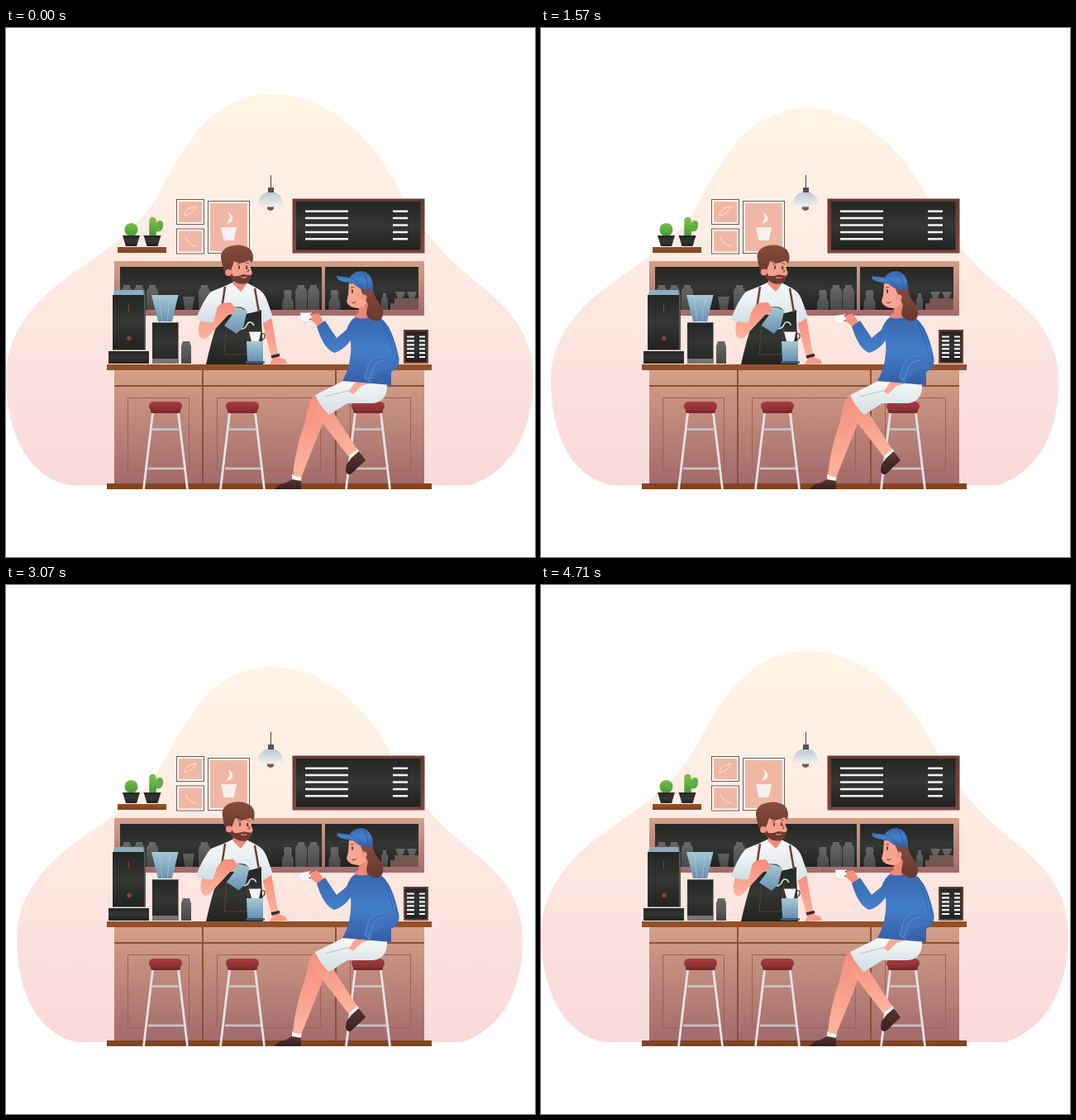
Write an HTML page that moves like this. It is 640 by 640 pixels and loops after 4.78 s.

```html
<!DOCTYPE html>
<html lang="en">
<head>
<meta charset="utf-8">
<title>Coffee bar</title>
<style>
html, body { margin: 0; width: 100%; height: 100%; overflow: hidden; background: #fff; }
svg { display: block; width: 100vw; height: 100vh; }
</style>
</head>
<body>
<svg viewBox="0 0 640 640" fill="none">
<defs id="defs">
  <g id="stool">
    <path d="M177 485.500H209M172 533H216" stroke="#c3bfc2" stroke-width="3"/>
    <path d="M177.500 466L166.500 558M208.500 466L219.500 558" stroke="#e5e3e5" stroke-width="2.800"/>
    <rect x="175" y="457" width="36" height="9" rx="2.500" fill="#7b2a2d"/>
    <rect x="173" y="452" width="40" height="11" rx="5.500" fill="url(#seat)"/>
  </g>
  <path id="bottle" d="M3 0H11V3Q14 5 14 8V30H0V8Q0 5 3 3Z" fill="url(#grey)"/>
  <path id="jug" d="M3 0H11L12 5L11 8L14 15V24H0V15L3 8L2 5Z" fill="url(#grey)"/>
  <path id="pot" d="M0 0H21L17 13H4Z" fill="url(#dark)"/>
</defs>

<path id="blob" fill="url(#wall)" d="M322 80C385 80 437 125 470 186C492 226 515 262 553 294C598 332 638 358 638 425C638 480 616 535 562 553H76C22 542 0 482 0 422C0 375 28 336 68 306C116 270 158 248 187 197C212 150 245 80 322 80Z"/>

<!-- lamp -->
<path d="M320.500 178V194" stroke="#4c4444"/>
<path d="M316 215H324V219Q320 223 316 219Z" fill="#80564d"/>
<path d="M305 215C304 204 312 198 320 198S336 204 335 215Q320 218 305 215Z" fill="url(#lamp)"/>
<rect x="317" y="193" width="7" height="6" fill="#594f50"/>

<!-- pictures -->
<g fill="#fff8f3" stroke="#665d60">
  <rect x="206.500" y="207.500" width="33" height="30"/>
  <rect x="206.500" y="243" width="33" height="30"/>
  <rect x="244.500" y="209.500" width="50" height="63"/>
</g>
<path d="M209 210H237V235H209ZM209 245.500H237V270.500H209ZM247 212H292V270H247Z" fill="#f0b8a4"/>
<path d="M216 227Q225 226 230 216Q217 217 216 227M217 253Q220 262 230 264" stroke="#fbe5dc"/>
<path d="M260 241H279L275.500 257H263.500Z" fill="#f7f0ee"/>
<path d="M267 237Q276 235 274 229Q273 225 268 223Q272 228 270 231Z" fill="#f7f0ee"/>

<!-- plants -->
<rect x="135" y="265" width="59" height="7" fill="url(#wood)"/>
<circle cx="151.500" cy="244" r="8" fill="url(#leaf)"/>
<path d="M177.500 251V233M180 242H184Q186 242 186 237" stroke="url(#leaf)" stroke-width="8.500" stroke-linecap="round"/>
<path d="M183 243Q186 243 186.500 237" stroke="#61ad45" stroke-width="5" stroke-linecap="round"/>
<use href="#pot" x="141" y="251"/><use href="#pot" x="166.500" y="251"/>

<!-- menu -->
<rect x="346.500" y="206.500" width="160" height="66" fill="url(#frame)"/>
<rect x="351" y="210" width="150.500" height="58.500" fill="url(#dark)"/>
<path id="menu" stroke="#f4f4f3" stroke-width="2.500"/>

<!-- back shelf -->
<rect x="131" y="282" width="375" height="66" fill="url(#rose)"/>
<path d="M138 289H382V341H138ZM386 289H499V341H386Z" fill="url(#dark)"/>
<use href="#bottle" x="139" y="311"/><use href="#bottle" x="154" y="311"/><use href="#bottle" x="170" y="311"/>
<use href="#bottle" x="233" y="311"/><use href="#bottle" x="350" y="311"/><use href="#bottle" x="365" y="311"/>
<use href="#jug" x="334" y="317"/><use href="#jug" x="390.500" y="317"/>
<path d="M214 325H228L225.500 341H216.500ZM456 321H460V325L462 328V341H454V328L456 325ZM471 319H483L480 327H474ZM485 319H497L494 327H488Z" fill="url(#grey)"/>
<path d="M470 327H499V341H465V333H470Z" fill="#765651"/>

<!-- machines -->
<path d="M131 317H166L167 323H130Z" fill="#8eacbf"/>
<path d="M129 323H169V390H129Z" fill="url(#dark)"/>
<path d="M168 323V390" stroke="#666" stroke-width="1.500"/>
<path d="M129 389.500H169" stroke="#858181"/>
<rect x="124" y="391" width="49" height="15" fill="url(#dark)"/>
<path d="M148.500 334V343" stroke="#8e3e3d"/><circle cx="149" cy="375.500" r="2.700" fill="#8e3e3d"/>
<path d="M176 323H208.500L201 355H184Z" fill="url(#glass)"/>
<path d="M185 323L189 355M199 323L195 355" stroke="#b5d1dc" stroke-opacity=".5"/>
<rect x="177" y="356" width="31.500" height="50" fill="url(#dark)"/>
<rect x="177" y="400" width="31.500" height="6" fill="#777575"/>
<path d="M177 356.500H208" stroke="#686767"/>
<path d="M214 379H222L224 385V406H212V385Z" fill="url(#grey)"/>

<!-- barista -->
<path d="M310 354L321 350L329 395L328 401H322Q315 378 310 354Z" fill="url(#skin)"/>
<path d="M319 407Q322 399 329 398L338 401L340 406Z" fill="#f69c86"/>
<path d="M321 398L331 395.500" stroke="#3d2a2a" stroke-width="3.500"/>
<path d="M263 313L276 307H289L304 315Q312 319 316 330L323 350L310 358L308 370H256L255 342L250 357L230 353Q238 331 248 319Z" fill="url(#shirt)"/>
<path d="M274 309L276 302H289L291 310L284 319Z" fill="#ef8979"/>
<path d="M261 345Q284 350 309 341V354Q311 380 311 407H242Q248 379 256 356Z" fill="url(#dark)"/>
<path d="M265 313L260 346M301 315L306 344" stroke="#704136" stroke-width="2.500"/>
<path d="M267 360H294L291 395H264Z" stroke="#6d4036" stroke-width=".8"/>
<path d="M291 379H311V403H292Z" fill="url(#glass)"/>
<path d="M290 404.500H313" stroke="#3d6281" stroke-width="2.500"/>
<path d="M308 370Q314 368 313 374Q311 379 307 376" stroke="#342f31" stroke-width="1.200"/>
<path d="M294 367.500H308.500L306 379H297Z" fill="#f4f3f4"/>
<g id="pour">
  <path d="M276 338Q292 337 290 347L285 354" stroke="#40464c" stroke-width="1.300"/>
  <path d="M281 363Q288 366 291 360Q293 354 298 357L300 360" stroke="#dde9ee" stroke-width="1.500"/>
  <path d="M276 337L292 342L287 362L279 370L264 360L273 348Z" fill="url(#glass)"/>
  <path d="M235 354Q231 365 234 373Q238 379 244 374L268 348L274 345L278 340L272 332L261 333L255 338L246 356Z" fill="url(#skin)"/>
  <path d="M265 341L275 338M267 345L276 341" stroke="#ed8f7c" stroke-width=".8"/>
</g>
<path d="M248 319L259 325L251 356Q239 357 230 352Q238 330 248 319Z" fill="url(#shirt)"/>
<g id="head">
  <path d="M269 278L293 275L296 291L298 296L295 302Q291 309 280 308Q271 304 269 295Z" fill="#f69f8b"/>
  <path d="M270 292L275 300Q281 301 287 298Q293 299 296 299Q296 307 290 309Q278 312 270 300Z" fill="#6a3a31"/>
  <path d="M261 283Q257 271 268 265Q283 259 295 267Q301 274 298 284L294 281Q283 287 276 282L272 294L268 299L263 292Z" fill="url(#hair)"/>
  <circle cx="269" cy="296" r="4" fill="#f29380"/>
  <path d="M279 286L284 284.500M290 284L294 285M292 290L294 294L291 295" stroke="#673832" stroke-width=".8"/>
  <path d="M282 288V291M291 288V291" stroke="#392326" stroke-width="1.500" stroke-linecap="round"/>
  <path d="M284 301.500Q288 303 291 301" stroke="#ed9986" stroke-width="1.200"/>
</g>

<!-- small board -->
<rect x="481" y="365" width="30" height="41" fill="url(#frame)"/>
<rect x="483" y="367" width="26" height="37" fill="url(#dark)"/>
<path id="specials" stroke="#f4f4f3" stroke-width="2.200"/>

<!-- counter -->
<rect x="131" y="413" width="375" height="139" fill="url(#rose)"/>
<path d="M131 433H506M238 414V551M399 414V551" stroke="#8d5032" stroke-width="2"/>
<path d="M147.500 447.500H221.500V535.500H147.500ZM255.500 447.500H380.500V535.500H255.500ZM416.500 447.500H489.500V535.500H416.500Z" stroke="#a26050"/>
<path d="M122 407H515V414H122ZM122 551H515V558H122Z" fill="url(#wood)"/>
<use href="#stool"/><use href="#stool" x="93"/><use href="#stool" x="245"/>

<!-- guest -->
<path d="M346 540L358 543L356 550L346 549Z" fill="#f7f5f5"/>
<path d="M368 449L389 464L357 544L347 541Q350 509 361 479Z" fill="url(#skin)"/>
<path d="M325 558Q330 551 339 550L346 546L357 548V558Z" fill="url(#shoe)"/>
<path d="M413 515L424 508L429 514L418 522Z" fill="#f7f5f5"/>
<path d="M376 443Q364 448 370 461L414 518L425 510L393 460Z" fill="url(#skin)"/>
<path d="M412 528L418 520L427 512L435 523L418 539Q412 542 411 535Z" fill="url(#shoe)"/>
<path d="M408 427L461 430Q462 452 444 454H413L391 468Q380 458 374 444Z" fill="url(#shirt)"/>
<path d="M386 446Q403 441 418 438" stroke="#a7b0b3" stroke-width=".8"/>
<path d="M436 421L440 430L430 433L420 443L415 440L421 430Z" fill="#f9a891"/>
<g id="sip">
  <path d="M356 344.500H370Q369 354 365 355H360Q356 353 356 344.500Z" fill="#f8f6f6"/>
  <path d="M356 355.500H368" stroke="#dcd9db"/>
  <path d="M368 347Q375 344 374 350Q372 354 367 352" stroke="#443336" stroke-width="1.200"/>
  <path d="M370 346L378 345L383 353L385 361L378 362L369 353Z" fill="#f5917c"/>
</g>
<path d="M424 349Q441 344 456 353Q468 365 475 397Q478 410 466 416V432L407 427Q419 406 417 378Q407 391 397 393Q384 388 376 361L386 354L400 375L412 365Q416 353 424 349Z" fill="url(#blue)"/>
<path d="M456 358Q467 380 469 396M462 361Q472 382 473 401" stroke="#315da5" stroke-width=".8"/>
<path d="M457 398Q442 398 437 412L434 423L441 429Q447 414 471 411" fill="#3f72bd"/>
<path d="M457 397Q441 397 437 412L434 423L441 429M459 402Q447 402 443 414L439 425" stroke="#5688cb" stroke-width="1.200"/>
<path d="M426 332L438 330L441 349Q430 354 421 349L427 344Z" fill="#ee8775"/>
<path d="M415 309L436 310L439 328Q434 338 426 339Q414 338 412 331L414 323Z" fill="#f8a590"/>
<path d="M428 313L443 311Q444 324 452 333Q460 345 453 353Q446 357 437 349Q435 345 438 335L431 321Z" fill="url(#hair)"/>
<circle cx="433" cy="326" r="3.500" fill="#f39983"/>
<path d="M417 314L421 313.500M418 332Q421 334 424 331" stroke="#763e38"/>
<path d="M419 317V320" stroke="#392326" stroke-width="1.500" stroke-linecap="round"/>
<path d="M400 300L416 302Q420 294 431 294Q444 297 444 316Q429 319 420 309Q407 308 401 304Z" fill="url(#blue)"/>
<path d="M416 302Q426 305 432 315M431 294Q438 303 438 317" stroke="#315da5"/>
</svg>
<script>
const $ = id => document.getElementById(id);

const gradients = {
  wall: ['#fff5e5', '#fde9e2', '#fad9d9'], lamp: ['#b7c9d3', '#f5f1ee'],
  seat: ['#a73e40', '#872f32'], grey: ['#696969', '#484949'],
  dark: ['#242624', '#343633', '#202220'], leaf: ['#79bd48', '#439a3e'],
  wood: ['#93512a', '#80441f'], frame: ['#663a32', '#80473d'],
  rose: ['#d4a088', '#a26a6b'], glass: ['#a4cad4', '#688fb2'],
  skin: ['#f58d7c', '#fbb69f'], shirt: ['#f9f9f9', '#cfdee3'],
  hair: ['#874d3e', '#66382f'], shoe: ['#593633', '#35201f'],
  blue: ['#3865ad', '#437fc8', '#365da5']
};
$('defs').innerHTML += Object.entries(gradients).map(([id, colors]) =>
  `<linearGradient id="${id}" x2="0" y2="1">` + colors.map((color, i) =>
    `<stop offset="${i / (colors.length - 1)}" stop-color="${color}"/>`).join('') +
  '</linearGradient>').join('');

function rows(id, count, top, step, columns) {
  let path = '';
  for (let i = 0; i < count; i++)
    for (const [left, right] of columns) path += `M${left} ${top + i * step}H${right}`;
  $(id).setAttribute('d', path);
}
rows('menu', 5, 221.7, 8.4, [[362, 414], [468, 486]]);
rows('specials', 6, 373.5, 4.9, [[485, 494], [500, 507]]);

const LOOP = 4780, FPS = 14;
const move = (id, value) => $(id).setAttribute('transform', value);

function draw(now) {
  // The whole scene steps at 14 poses per second.
  const step = Math.floor((now % LOOP + 5) * FPS / 1000);
  const sway = (1 - Math.cos(2 * Math.PI * step / 67)) / 2;
  move('blob', `translate(319.5 553) scale(${1 - 0.05 * sway}) translate(-319.5 -553)`);
  move('head', `rotate(${3.5 * sway} 282 312)`);
  move('pour', `translate(${3.4 * sway} ${-0.5 * sway})`);
  move('sip', `rotate(${-11 * sway} 381 357)`);
  requestAnimationFrame(draw);
}
draw(0);
</script>
</body>
</html>
```
